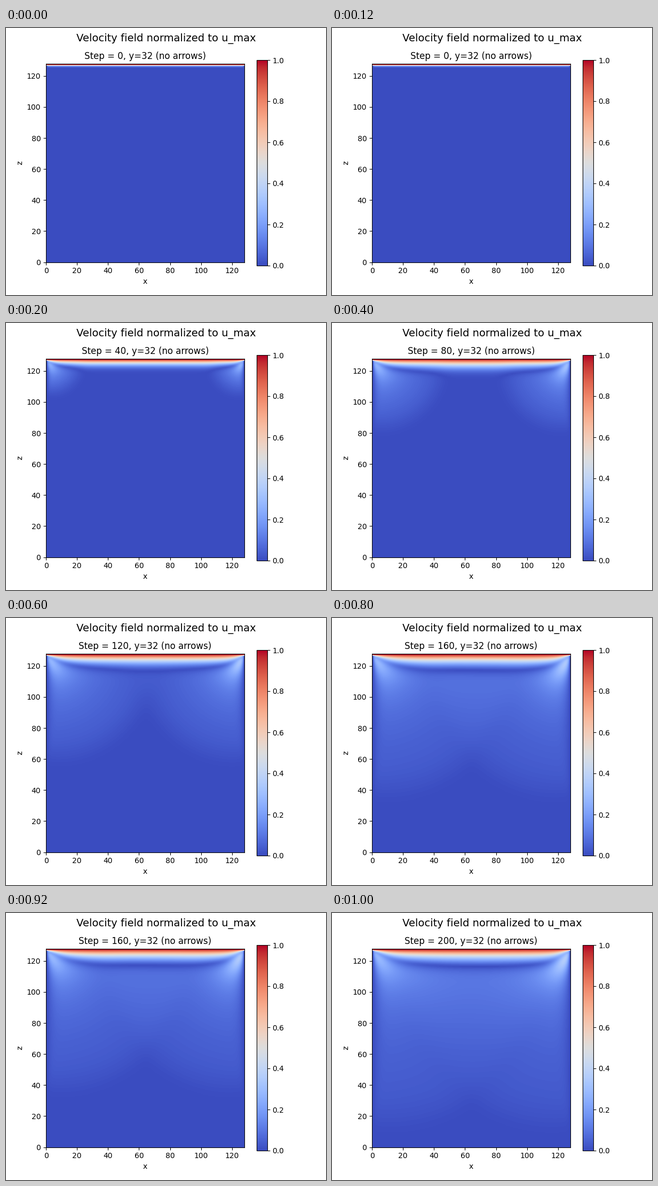
A matplotlib script that plays this animation: 600 px wide and 500 px high, repeating every 1200 ms.

```python
import numpy as np
import matplotlib.pyplot as plt
from matplotlib.animation import FuncAnimation

SIZE = 128
STEPS_PER_FRAME = 40
FRAMES = 6
LID_SPEED = 0.1
TAU = 0.85

# D2Q9 lattice, arrays are indexed [direction, z, x]
CX = np.array([0, 1, 0, -1, 0, 1, -1, -1, 1])
CZ = np.array([0, 0, 1, 0, -1, 1, 1, -1, -1])
WEIGHTS = np.array([4 / 9] + [1 / 9] * 4 + [1 / 36] * 4)


def equilibrium(rho, ux, uz):
    ndim = np.ndim(rho)
    shape = (9,) + (1,) * ndim
    cx, cz, w = (a.reshape(shape) for a in (CX, CZ, WEIGHTS))
    cu = cx * ux + cz * uz
    return w * rho * (1 + 3 * cu + 4.5 * cu**2 - 1.5 * (ux**2 + uz**2))


def macroscopic(f):
    rho = f.sum(axis=0)
    ux = np.tensordot(CX, f, axes=1) / rho
    uz = np.tensordot(CZ, f, axes=1) / rho
    return rho, ux, uz


def apply_wall(f, rho, ux, uz, wall, inner, speed=0.0):
    """Non-equilibrium extrapolation from the neighbouring line of nodes."""
    rho[wall] = rho[inner]
    ux[wall], uz[wall] = speed, 0.0
    at = (slice(None),)
    f[at + wall] = (f[at + inner]
                    + equilibrium(rho[wall], ux[wall], uz[wall])
                    - equilibrium(rho[inner], ux[inner], uz[inner]))


def simulate():
    """Lid-driven cavity: speed relative to the lid at each shown step."""
    rho = np.ones((SIZE, SIZE))
    ux, uz = np.zeros_like(rho), np.zeros_like(rho)
    ux[-1] = LID_SPEED
    f = equilibrium(rho, ux, uz)
    every, middle = slice(None), slice(1, -1)
    fields = []
    for step in range((FRAMES - 1) * STEPS_PER_FRAME + 1):
        f += (equilibrium(rho, ux, uz) - f) / TAU
        for i in range(1, 9):
            f[i] = np.roll(f[i], (CZ[i], CX[i]), axis=(0, 1))
        rho, ux, uz = macroscopic(f)
        state = f, rho, ux, uz
        apply_wall(*state, (middle, 0), (middle, 1))
        apply_wall(*state, (middle, -1), (middle, -2))
        apply_wall(*state, (0, every), (1, every))
        apply_wall(*state, (-1, every), (-2, every), LID_SPEED)
        if step % STEPS_PER_FRAME == 0:
            fields.append(np.hypot(ux, uz) / LID_SPEED)
    return fields


fields = simulate()

fig, ax = plt.subplots(figsize=(6, 5), dpi=100)
fig.suptitle("Velocity field normalized to u_max", fontsize=14)
image = ax.imshow(fields[0], origin="lower", extent=(0, SIZE, 0, SIZE),
                  cmap="coolwarm", vmin=0, vmax=1, interpolation="bilinear")
fig.colorbar(image, ax=ax)
ax.set_xlabel("x")
ax.set_ylabel("z")
ax.set_xticks(range(0, SIZE, 20))
ax.set_yticks(range(0, SIZE, 20))
title = ax.set_title("")


def update(frame):
    image.set_data(fields[frame])
    title.set_text(f"Step = {frame * STEPS_PER_FRAME}, y=32 (no arrows)")
    return image, title


animation = FuncAnimation(fig, update, frames=FRAMES, interval=200,
                          repeat=True, repeat_delay=0)
plt.show()
```
